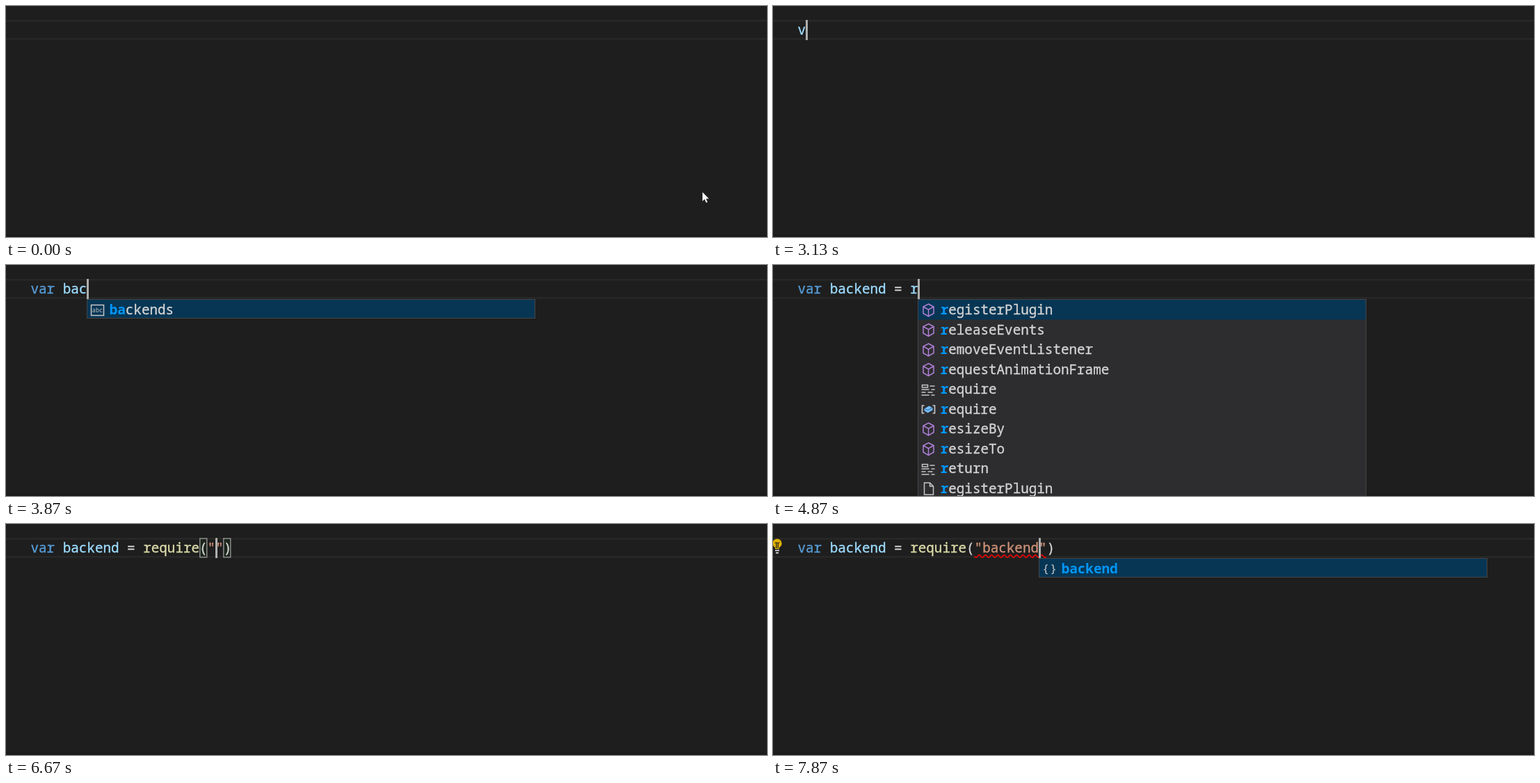
An HTML page with a canvas for the animation above (8 s loop, 1094x332 px).

```html
<!DOCTYPE html>
<html lang="en">
<head>
<meta charset="utf-8">
<title>Editor autocomplete</title>
<style>
  html, body { margin: 0; width: 100%; height: 100%; overflow: hidden; background: #1e1e1e; }
  canvas { display: block; }
</style>
</head>
<body>
<canvas id="stage" width="1094" height="332"></canvas>
<script>
const ctx = document.getElementById('stage').getContext('2d');
const LOOP = 8000, TICK = 200 / 3;
const CHAR = 11.55, LEFT = 35.5, ROW = 28.5, LINE_TOP = 20, POPUP_TOP = 49, POPUP_W = 645;
const FAMILY = '"Noto Sans Mono", "DejaVu Sans Mono", monospace';
const FONT = `19.25px ${FAMILY}`;
const GREY = '#c5c5c5', PLAIN = '#d4d4d4';

// Each suggestion is "icon:label"
const list = s => s.split(' ').map(item => item.split(':'));
const LISTS = {
  v: list('k:var v:VarDate v:ValidityState v:VBArray v:VideoPlaybackQuality v:VideoTrack v:VideoTrackList k:void v:VTTCue v:VTTRegion'),
  var: list('k:var v:VarDate v:navigator v:SVGAnimatedInteger v:SVGAnimatedNumber v:SVGAnimatedNumberList v:SVGAnimatedRect v:SVGAnimatedString v:SVGAnimatedTransformList v:SVGAnimatedPreserveAspectRatio'),
  word: list('a:backends'),
  r: list('c:registerPlugin c:releaseEvents c:removeEventListener c:requestAnimationFrame k:require v:require c:resizeBy c:resizeTo k:return f:registerPlugin'),
  req: list('c:requestAnimationFrame k:require v:require f:require c:webkitRequestAnimationFrame'),
  requi: list('k:require v:require f:require c:requestAnimationFrame c:webkitRequestAnimationFrame'),
  modules: list('m:audio m:backend m:crypto m:db m:engine m:event m:format m:fs m:graphics m:helpers'),
  backend: list('m:backend')
};

// time, code with "|" as caret, suggestion list, matched query
const STEPS = [
  [0, ''],
  [2600, '|'],
  [3070, 'v|'],
  [3200, 'v|', 'v', 'v'],
  [3270, 'va|', 'v', 'v'],
  [3330, 'var|', 'var', 'var'],
  [3470, 'var |', 'var', 'var'],
  [3530, 'var |'],
  [3670, 'var b|', 'word', 'b'],
  [3730, 'var ba|', 'word', 'ba'],
  [3870, 'var bac|', 'word', 'ba'],
  [3930, 'var bac|', 'word', 'bac'],
  [4000, 'var back|', 'word', 'bac'],
  [4070, 'var backe|', 'word', 'back'],
  [4130, 'var backe|', 'word', 'backe'],
  [4200, 'var backen|', 'word', 'backe'],
  [4270, 'var backend|', 'word', 'backen'],
  [4330, 'var backend|', 'word', 'backend'],
  [4400, 'var backend |', 'word', 'backend'],
  [4470, 'var backend |'],
  [4600, 'var backend =|'],
  [4800, 'var backend = |'],
  [4870, 'var backend = r|', 'r', 'r'],
  [4930, 'var backend = re|', 'r', 'r'],
  [5000, 'var backend = re|', 'r', 're'],
  [5070, 'var backend = req|', 'r', 're'],
  [5130, 'var backend = req|', 'req', 'req'],
  [5200, 'var backend = requ|', 'req', 'requ'],
  [5270, 'var backend = requi|', 'req', 'requ'],
  [5330, 'var backend = requi|', 'requi', 'requi'],
  [5400, 'var backend = requir|', 'requi', 'requi'],
  [5470, 'var backend = require|', 'requi', 'requir'],
  [5530, 'var backend = require|', 'requi', 'require'],
  [6000, 'var backend = require(|)', 'requi', 'require'],
  [6070, 'var backend = require(|)'],
  [6600, 'var backend = require("|")'],
  [6730, 'var backend = require("|")', 'modules', ''],
  [7000, 'var backend = require("b|")', 'modules', ''],
  [7130, 'var backend = require("b|")', 'backend', 'b'],
  [7270, 'var backend = require("ba|")', 'backend', 'b'],
  [7330, 'var backend = require("bac|")', 'backend', 'ba'],
  [7470, 'var backend = require("back|")', 'backend', 'bac'],
  [7600, 'var backend = require("backe|")', 'backend', 'back'],
  [7670, 'var backend = require("backen|")', 'backend', 'backe'],
  [7800, 'var backend = require("backend|")', 'backend', 'backen'],
  [7870, 'var backend = require("backend|")', 'backend', 'backend']
];

const columnX = n => LEFT + n * CHAR;

function rect(x, y, w, h, color) {
  ctx.fillStyle = color;
  ctx.fillRect(x, y, w, h);
}

function text(str, x, y, color, font = FONT) {
  ctx.font = font;
  ctx.fillStyle = ctx.strokeStyle = color;
  ctx.fillText(str, x, y);
  // A hairline gives regular text its slightly heavier stems
  if (font === FONT) {
    ctx.lineWidth = .35;
    ctx.strokeText(str, x, y);
  }
}

function path(d, x, y, stroke, fill, width = 1.5) {
  ctx.save();
  ctx.translate(x, y);
  const shape = new Path2D(d);
  if (fill) { ctx.fillStyle = fill; ctx.fill(shape); }
  if (stroke) { ctx.strokeStyle = stroke; ctx.lineWidth = width; ctx.stroke(shape); }
  ctx.restore();
}

// Icons are drawn around their centre
const ICONS = {
  c: (x, y) => path('M0-9L7.5-5V4.5L0 9L-7.5 4.5V-5ZM-7.5-5L0-.8L7.5-5M0-.8V9', x, y, '#b180d7'),
  k: (x, y) => path('M-9-6.5H-1V-3H-9ZM2-5H9M-10 0H1M4 0H9M-10 4H-4M-1 4H6M-10 8H1M4 8H9', x, y, GREY),
  v: (x, y) => {
    path('M-6-5.5H-9V5.5H-6M6-5.5H9V5.5H6', x, y, GREY, null, 1.7);
    path('M-6-1L1-5L6-2V1L-1 5L-6 2Z', x, y, null, '#75beff');
    path('M-5-.8L-1 1.2L5-2', x, y, '#2d5f86', null, 1);
  },
  f: (x, y) => path('M-6-8.5H2L7-3.5V8.5H-6ZM2-8.5V-3.5H7', x, y, GREY),
  a: (x, y) => {
    path('M-9-7.5H9V7.5H-9Z', x, y, GREY);
    text('abc', x - 7.7, y + 3, GREY, `8.5px ${FAMILY}`);
  },
  m: (x, y) => {
    text('{', x - 10.5, y + 5, GREY, `17px ${FAMILY}`);
    text('}', x + .5, y + 5, GREY, `17px ${FAMILY}`);
  }
};

function drawLabel(label, query, x, y) {
  let matched = 0;
  [...label].forEach((ch, i) => {
    const hit = matched < query.length && ch.toLowerCase() === query[matched];
    if (hit) matched++;
    text(ch, x + i * CHAR, y, hit ? '#0097fb' : PLAIN, hit ? 'bold ' + FONT : FONT);
  });
}

function drawPopup(items, query, x) {
  const height = Math.floor(items.length * ROW);
  rect(x, POPUP_TOP, POPUP_W, height, '#454545');
  rect(x + 1, POPUP_TOP + 1, POPUP_W - 2, height - 2, '#2d2d30');
  rect(x + 1, POPUP_TOP + 1, POPUP_W - 2, Math.min(ROW, height - 2), '#073655');
  items.forEach(([icon, label], i) => {
    const y = POPUP_TOP + i * ROW;
    ICONS[icon](x + 15.5, y + 16);
    drawLabel(label, query, x + 32.7, y + 22);
  });
}

function tokenColor(token, next) {
  if (token[0] === '"') return '#ce9178';
  if (token === 'var') return '#569cd6';
  if (/\w/.test(token)) return next === '(' ? '#dcdcaa' : '#9cdcfe';
  return PLAIN;
}

function drawCode(code) {
  for (const m of code.matchAll(/"[^"]*"|\w+|\S/g)) {
    const color = tokenColor(m[0], code[m.index + m[0].length]);
    text(m[0], columnX(m.index), LINE_TOP + 21, color);
  }
}

function drawBracketBox(column) {
  const x = Math.round(columnX(column) - .5);
  rect(x, LINE_TOP, 11.5, 28.5, 'rgba(0,100,0,.1)');
  ctx.strokeStyle = '#888';
  ctx.lineWidth = 1.5;
  ctx.strokeRect(x + .75, LINE_TOP + .75, 10, 27);
}

function drawSquiggle(from, to) {
  ctx.beginPath();
  for (let x = columnX(from); x <= columnX(to); x++) {
    ctx.lineTo(x, 46.3 + 1.9 * Math.sin((x - columnX(from)) * Math.PI * 2 / 9));
  }
  ctx.strokeStyle = '#f00000';
  ctx.lineWidth = 1.6;
  ctx.stroke();
}

function drawBulb() {
  path('M3 36V34C1 32-.7 31-.7 28A6.7 6.7 0 0 1 12.7 28C12.7 31 11 32 9 34V36Z', 0, 0, null, '#ddb100');
  path('M2.5 27H9.5M4.8 27V35M7.2 27V35', 0, 0, '#1e1e1e', null, 1.2);
  path('M3 38.2H9M4 41.5H8', 0, 0, PLAIN, null, 1.8);
}

function drawPointer(t) {
  const stops = [[1001, 267], [941, 142], [496, 21]];
  const leg = t < 1730 ? 0 : 1;
  const [start, count] = leg ? [1730, 5] : [1330, 3];
  const done = Math.floor((t - start + 4) / TICK) + 1;
  const p = Math.max(0, Math.min(1, done / count));
  const ease = p * p * (3 - 2 * p);
  const [x, y] = stops[leg].map((v, i) => Math.round(v + (stops[leg + 1][i] - v) * ease));
  path('M0 0V14L3.2 11L5.4 16L7.8 15L5.7 10.2H10Z', x, y, '#111', '#fff', .5);
}

function draw(t) {
  const [, marked, items, query] = STEPS.findLast(step => step[0] <= t);
  const caret = marked.indexOf('|');
  const code = marked.replace('|', '');
  const caretX = Math.round(columnX(caret) - .3);

  rect(0, 0, 1094, 332, '#1e1e1e');
  rect(0, 328, 1094, 4, '#1b1b1b');
  rect(0, 20, 1094, 2.5, '#282828');
  rect(0, 46, 1094, 2.5, '#282828');

  if (t >= 6200 && t < 6730) [code.indexOf('('), code.indexOf(')')].forEach(drawBracketBox);
  drawCode(code);
  if (t >= 7130) {
    drawSquiggle(code.indexOf('"'), code.indexOf(')'));
    drawBulb();
  }
  if (items) drawPopup(LISTS[items], query, caretX);
  if (caret >= 0) rect(caretX, LINE_TOP, 3, 29, '#aeafad');
  if (t < 3070) drawPointer(t);
}

function frame() {
  draw(performance.now() % LOOP);
  requestAnimationFrame(frame);
}
frame();
</script>
</body>
</html>
```
